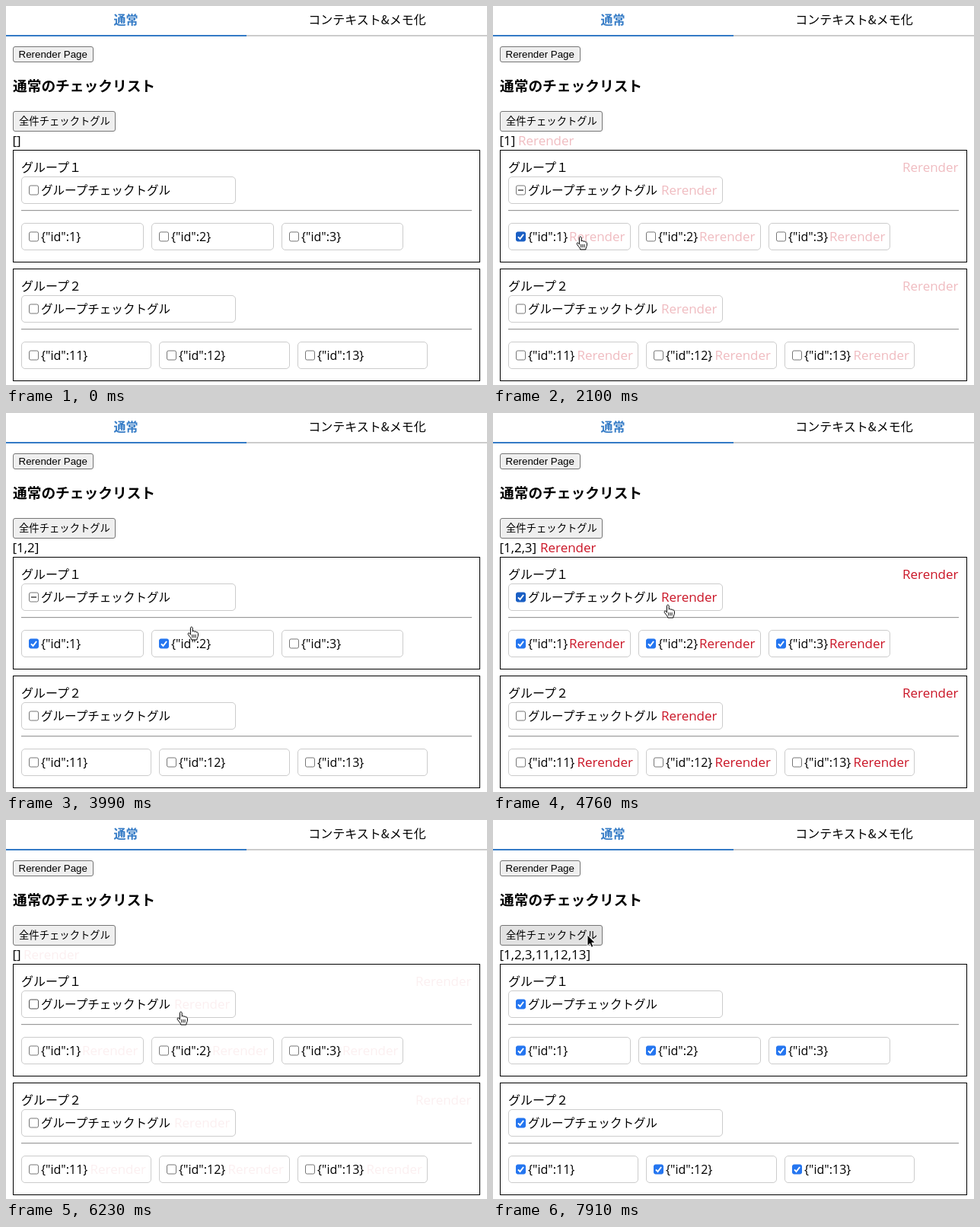
These frames come from a looping animation (632 by 498 pixels, 8000 ms). An HTML page:

```html
<!DOCTYPE html>
<html lang="ja">
<head>
<meta charset="utf-8">
<style>
html, body { margin: 0; width: 100%; height: 100%; overflow: hidden; background: #fff; }
svg { display: block; width: 100%; height: 100%; }
text { font: 16px "Noto Sans CJK JP", "Noto Sans CJK", sans-serif; white-space: pre; }
.tab { text-anchor: middle; }
.active { font-weight: 700; fill: #347bc6; }
.heading { font-size: 18.72px; font-weight: 700; }
.button { font: 13.333px "Liberation Sans", "Noto Sans CJK JP", sans-serif; }
.toggle { font-size: 15.55px; }
.json { font: 16px "Open Sans", "Noto Sans", sans-serif; }
.list, .mark { font: 17px "Open Sans", "Noto Sans", sans-serif; }
.mark { fill: #ca1526; }
</style>
</head>
<body>
<svg id="stage" viewBox="0 0 632 498"></svg>
<script>
const LOOP = 8000, STEP = 70, FADE = 490;
const IDS = [1, 2, 3, 11, 12, 13];
const BLUE = '#2576f0', DARK_BLUE = '#1a5fc4';

// Each click: press time, state change, start of the label fade, resulting selection.
const clicks = [
  { press: 1610, at: 1750, fade: 1750, release: 1750, ids: [1] },
  { press: 3010, at: 3150, fade: 3150, release: 3220, ids: [1, 2] },
  { press: 4620, at: 4760, fade: 4760, release: 4760, ids: [1, 2, 3] },
  { press: 5670, at: 5740, fade: 5770, release: 5740, ids: [], lingerUntil: 6790 },
  { press: 7280, at: 7420, fade: 7420, release: 7420, ids: IDS }
];

// Pointer hotspot: time, x, y
const path = [
  [70, 612, 14], [490, 112, 290], [630, 106, 295], [770, 106, 295],
  [840, 118, 306], [910, 118, 306], [980, 114, 303], [2380, 114, 303],
  [2870, 257, 304], [3920, 257, 304], [3990, 243, 281], [4270, 229, 252],
  [6720, 229, 252], [7140, 127, 134], [7280, 124, 151], [LOOP, 124, 151]
];

const stage = document.getElementById('stage');
const marks = [], checks = [];

function add(tag, attrs, parent = stage) {
  const el = document.createElementNS('http://www.w3.org/2000/svg', tag);
  set(el, attrs);
  parent.append(el);
  return el;
}
function set(el, attrs) {
  for (const key in attrs) el.setAttribute(key, attrs[key]);
}
function text(x, y, content, cls = '') {
  const el = add('text', { x, y, class: cls });
  el.textContent = content;
  return el;
}
function box(x, y, w, h, stroke, fill = 'none', rx = 0) {
  return add('rect', { x: x + .5, y: y + .5, width: w - 1, height: h - 1, rx, stroke, fill });
}
function mark(x, y) {
  const el = text(x, y, 'Rerender', 'mark');
  marks.push(el);
  return el;
}
function checkLabel(x, y, w, ids, label, cls, markOffset) {
  box(x, y, w, 36, '#ccc', '#fff', 4.5);
  const left = x + 10, mid = y + 18;
  const square = add('rect', { x: left + .5, y: mid - 6, width: 12, height: 12, rx: 2 });
  const tick = add('path', {
    d: `M${left + 3} ${mid + .4}l2.5 2.6 4.6-6`, fill: 'none', stroke: '#fff', 'stroke-width': 2
  });
  const dash = add('path', { d: `M${left + 3} ${mid}h7`, stroke: '#666', 'stroke-width': 1.8 });
  text(x + 26, mid + 6, label, cls);
  mark(x + markOffset - 1, mid + 6);
  checks.push({ x, y, w, h: 36, ids, square, tick, dash });
}
function group(top, title, items) {
  box(9, top, 614, 148, '#000');
  text(20, top + 29, title);
  mark(611.5, top + 29).setAttribute('text-anchor', 'end');
  checkLabel(20, top + 35, 282, items.map(item => item[0]), 'グループチェックトグル', 'toggle', 202);
  add('path', { d: `M20 ${top + 79.5}H612`, stroke: '#9a9a9a' });
  add('path', { d: `M20 ${top + 80.5}H612`, stroke: '#eee' });
  for (const [id, x, w] of items) {
    checkLabel(x, top + 96, w, [id], `{"id":${id}}`, 'json', id > 9 ? 91.5 : 81);
  }
}

add('rect', { width: 632, height: 498, fill: '#fff' });
text(157.5, 24, '通常', 'tab active');
text(474.5, 24, 'コンテキスト&メモ化', 'tab');
add('rect', { x: 0, y: 38, width: 316, height: 2, fill: '#347bc6' });
add('rect', { x: 316, y: 38, width: 316, height: 2, fill: '#ccc' });
box(9, 53, 106, 21, '#767676', '#efefef', 2.5);
text(16.5, 68, 'Rerender Page', 'button');
text(9, 112, '通常のチェックリスト', 'heading');
const button = box(9, 138, 135, 27, '#767676', '#efefef', 2.5);
text(17, 156, '全件チェックトグル', 'button');
const list = text(8.5, 183, '[]', 'list');
const listMark = mark(0, 183);
group(189, 'グループ１', [[1, 20, 161], [2, 191, 161], [3, 362, 160]]);
group(345, 'グループ２', [[11, 20, 171], [12, 201, 172], [13, 383, 171]]);

const hand = add('g', { stroke: '#000', 'stroke-linejoin': 'round', 'stroke-linecap': 'round' });
add('path', {
  d: 'M-.6 9V1.7C-.6-.4 2.1-.4 2.2 1.7V6.2C2.6 5 4.6 5.2 4.8 6.6C5.4 5.6 7 5.9 7.2 7.2' +
     'C8 6.6 9.4 7.1 9.4 8.6V11C9.4 13 8 14.4 7.8 17H.8C.4 14.6-2 12.8-3.6 10.2C-4.6 8.4-2.8 7.4-1.8 8.6L-.6 10Z',
  fill: '#fff'
}, hand);
add('path', { d: 'M1.7 10.5v3.5M3.9 10.5v3.5M6.1 10.5v3.5', fill: 'none', 'stroke-width': .9 }, hand);
const arrow = add('path', {
  d: 'M0 0V14.5L3.3 11.4L5.4 16.3L7.9 15.2L5.8 10.4H10.2Z', fill: '#000', stroke: '#fff', 'stroke-width': 1
});

function pointerAt(t) {
  const i = Math.max(1, path.findIndex(key => key[0] > t));
  const [t0, x0, y0] = path[i - 1], [t1, x1, y1] = path[i];
  const u = Math.max(0, (t - t0) / (t1 - t0)), e = u * u * (3 - 2 * u);
  return { x: x0 + (x1 - x0) * e, y: y0 + (y1 - y0) * e };
}
function inside(p, r) {
  return p.x >= r.x && p.x < r.x + r.w && p.y >= r.y && p.y < r.y + r.h;
}
function show(el, visible) {
  el.setAttribute('visibility', visible ? 'visible' : 'hidden');
}
function fadeAt(t, click) {
  if (!click) return 0;
  const alpha = Math.min(1, Math.max(0, 1 - (t - click.fade) / FADE));
  return t < click.lingerUntil ? Math.max(.06, alpha) : alpha;
}

function render(time) {
  const t = Math.floor(time / STEP) * STEP;
  const click = clicks.filter(c => c.at <= t).pop();
  const selected = click ? click.ids : [];
  const pressed = clicks.some(c => t >= c.press && t < c.release);
  const pointer = pointerAt(t), visible = t >= path[0][0];

  list.textContent = `[${selected.join(',')}]`;
  const digits = selected.join('').length, commas = Math.max(0, selected.length - 1);
  listMark.setAttribute('x', 23 + digits * 10 + commas * 4.5);
  const alpha = fadeAt(t, click);
  for (const el of marks) el.setAttribute('opacity', alpha);

  for (const check of checks) {
    const count = check.ids.filter(id => selected.includes(id)).length;
    const full = count === check.ids.length;
    const hover = visible && !pressed && inside(pointer, check);
    const blue = hover ? DARK_BLUE : BLUE;
    set(check.square, {
      fill: full ? blue : '#fff',
      stroke: full ? blue : hover ? '#4f4f4f' : '#767676'
    });
    show(check.tick, full);
    show(check.dash, count > 0 && !full);
  }

  const overButton = visible && inside(pointer, { x: 9, y: 138, w: 135, h: 27 });
  button.setAttribute('fill', !overButton ? '#efefef' : pressed ? '#f5f5f5' : '#e2e2e2');

  const pointing = t >= 490 && pointer.y > 224;
  const transform = `translate(${Math.round(pointer.x)} ${Math.round(pointer.y)})`;
  set(hand, { transform });
  set(arrow, { transform });
  show(hand, visible && pointing);
  show(arrow, visible && !pointing);
}

const start = performance.now();
function frame() {
  render((performance.now() - start) % LOOP);
  requestAnimationFrame(frame);
}
frame();
</script>
</body>
</html>
```
